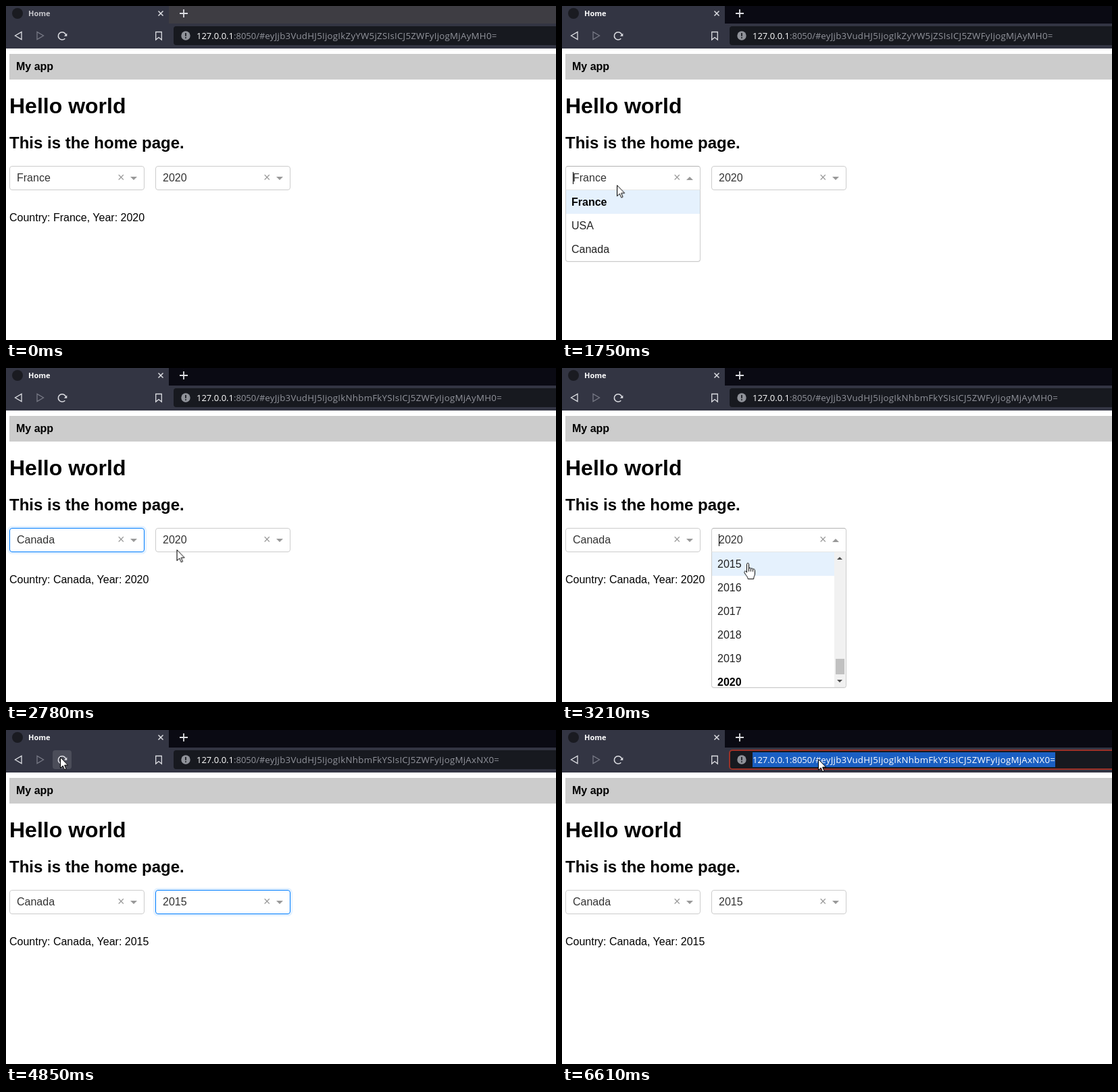
Animation of 814x495 px, one loop 8 s. Source, as an HTML page:

```html
<!DOCTYPE html>
<html lang="en">
<head>
<meta charset="utf-8">
<title>Home</title>
<style>
html, body { margin: 0; width: 100%; height: 100%; overflow: hidden; background: #fff; }
body { position: relative; font: 16px "Liberation Sans", Arial, sans-serif; color: #000; }
body *, .select::after { position: absolute; box-sizing: border-box; white-space: pre; margin: 0; }
svg * { position: static; }

/* Every step-wise change shares one 8 s clock. */
.t { animation: 8s step-end infinite; }
.hid { opacity: 0; }

/* Browser frame */
.strip { left: 0; top: 0; width: 100%; height: 26px; background: #3e3d43; animation-name: strip; }
.bar { left: 0; top: 26px; width: 100%; height: 37px; background: #333543; }
.tab { left: 0; top: 0; width: 241px; height: 27px; background: #333543; color: #c8c8cd; animation-name: tab; }
.tab b { left: 33px; top: 3px; font: 700 11px/16px "Open Sans", sans-serif; }
.icons { left: 0; top: 0; width: 280px; height: 63px; overflow: visible; fill: none; stroke: #dcdde2; stroke-width: 1.3; }
.reload { left: 69px; top: 30px; width: 28px; height: 28px; border-radius: 4px; background: #4b4d59; animation-name: reload; }
.field { left: 248px; top: 30px; width: 580px; height: 28px; border-radius: 4px; background: #17191f; }
.ring { left: 247px; top: 29px; width: 580px; height: 30px; border-radius: 5px; border: 2px solid #9c3127; animation-name: picked; }
.url { left: 282px; top: 33px; height: 22px; font: 13px/22px "Open Sans", sans-serif; color: #fff; }
.url * { position: static; }
.url span { color: #92949c; }
.url i { font-style: normal; font-size: 13.3px; letter-spacing: .25px; }

/* Page */
.head { left: 5px; top: 71px; width: 100%; height: 38px; padding-left: 10px; background: #ccc; font-weight: 700; line-height: 38px; }
h1 { left: 5px; top: 130px; font-size: 32px; line-height: 36px; }
h2 { left: 5px; top: 189px; font-size: 24px; line-height: 28px; }
.out { left: 5px; top: 304px; line-height: 20px; }
.select { top: 237px; width: 200px; height: 36px; border: 1px solid #ccc; border-radius: 4px; line-height: 34px; color: #333; }
.select > span { left: 10px; top: 0; }
.select > em { left: 159px; top: -1px; font-size: 18px; font-style: normal; color: #999; }
.select > i { left: 178px; top: 15px; border: 5px solid transparent; border-top-color: #999; border-bottom: 0; }
.caret { left: 10px; top: 8px; width: 1px; height: 18px; background: #000; }
.menu { left: -1px; top: 34px; width: 200px; overflow: hidden; background: #fff; border: 1px solid #ccc;
  border-top-color: #e6e6e6; border-radius: 0 0 4px 4px; box-shadow: 0 1px 0 #0000000f; line-height: 35px; color: #222; }
.menu p { left: 8px; top: calc(35px * var(--n)); height: 35px; }
.menu .on { color: #000; font-weight: 700; }
.lit { left: 0; top: 0; width: 100%; height: 35px; background: #e5f1fd; }
.scroll { right: 0; top: 0; width: 17px; height: 200px; background: #f1f1f1; }
.scroll * { left: 2px; top: 158px; width: 13px; height: 23px; background: #c1c1c1; }
.scroll .up, .scroll .down { left: 4px; top: 7px; width: 0; height: 0; background: none;
  border: 4px solid transparent; border-bottom-color: #505050; border-top: 0; }
.scroll .down { top: 189px; rotate: 180deg; }
.blank { left: 0; top: 63px; width: 100%; bottom: 0; background: #fff; animation-name: blank; }

/* Pointer */
.pointer { left: 0; top: 0; width: 0; height: 0; animation: move 8s infinite, appear 8s step-end infinite; }
.pointer svg { left: 0; top: 0; overflow: visible; width: 20px; height: 28px; fill: #fff; stroke: #000; stroke-linejoin: round; }
.halo { left: -12px; top: -12px; width: 24px; height: 24px; border-radius: 50%; background: #ffff0080; animation-name: click; }

@keyframes strip { 16%, 100% { background: #0a0a13; } }
@keyframes tab { 16%, 100% { color: #fff; } }
@keyframes home { 29.5%, 45%, 63.9% { opacity: 0; } 31.1%, 46.7%, 66.5% { opacity: 1; } }
@keyframes busy { 29.5%, 45%, 63.9% { opacity: 1; } 31.1%, 46.7%, 66.5% { opacity: 0; } }
@keyframes reload { 55.1% { opacity: .6; } 59.6% { opacity: 1; } 63.9% { opacity: .5; } 74.7%, 100% { opacity: 0; } }

@keyframes state-a { 30.3%, 100% { opacity: 0; } }
@keyframes state-b { 30.3% { opacity: 1; } 45.8%, 100% { opacity: 0; } }
@keyframes state-c { 45.8%, 100% { opacity: 1; } }
@keyframes picked { 81.6%, 100% { opacity: 1; } }
@keyframes mark { 81.6%, 100% { background: #1a5fc2; } }
@keyframes white { 81.6%, 100% { color: #fff; } }

@keyframes country-old { 29.5%, 100% { opacity: 0; } }
@keyframes country-new { 29.5%, 100% { opacity: 1; } }
@keyframes year-old { 45%, 100% { opacity: 0; } }
@keyframes year-new { 45%, 100% { opacity: 1; } }

@keyframes open1 { 16% { opacity: 1; } 29.5% { opacity: 0; } }
@keyframes open2 { 37.25% { opacity: 1; } 45% { opacity: 0; } }
@keyframes flip1 { 16% { rotate: 180deg; } 29.5%, 100% { rotate: 0deg; } }
@keyframes flip2 { 37.25% { rotate: 180deg; } 45%, 100% { rotate: 0deg; } }
@keyframes caret1 { 16% { opacity: 1; } 22.6% { opacity: 0; } }
@keyframes caret2 { 37.25% { opacity: 1; } 44% { opacity: 0; } }
@keyframes lit1 { 24.3% { translate: 0 35px; } 26% { translate: 0 70px; } }
@keyframes lit2 { 0% { translate: 0 175px; } 38.3%, 100% { translate: 0 0; } }
@keyframes box1 {
  11.2% { box-shadow: 0 1px 0 #0000000f; }
  16% { border-color: #b3b3b3 #ccc #d9d9d9; border-radius: 4px 4px 0 0; }
  29.5% { border-color: #007eff; border-radius: 4px; box-shadow: 0 0 0 3px #007eff1a; }
  37.25%, 100% { border-color: #ccc; border-radius: 4px; box-shadow: none; }
}
@keyframes box2 {
  35.2% { box-shadow: 0 1px 0 #0000000f; }
  37.25% { border-color: #b3b3b3 #ccc #d9d9d9; border-radius: 4px 4px 0 0; }
  45% { border-color: #007eff; border-radius: 4px; box-shadow: 0 0 0 3px #007eff1a; }
  62.1%, 100% { border-color: #ccc; border-radius: 4px; box-shadow: none; }
}
@keyframes blank { 62.1% { opacity: 1; } 63.9% { opacity: 0; } }

@keyframes appear { 0% { opacity: 0; } 4.1%, 100% { opacity: 1; } }
@keyframes click {
  15.1%, 28.6%, 36.4%, 44.1%, 59.6%, 80.8% { opacity: 1; }
  16.8%, 29.5%, 37.25%, 45%, 60.5%, 81.6% { opacity: 0; }
}
@keyframes arrow { 22.6%, 38.3% { opacity: 0; } 29.5%, 45% { opacity: 1; } }
@keyframes hand { 22.6%, 38.3% { opacity: 1; } 29.5%, 45% { opacity: 0; } }
@keyframes move {
  0%, 4.1% { translate: 418px 457px; animation-timing-function: ease-out; }
  12%, 21% { translate: 81px 262px; animation-timing-function: ease-in-out; }
  27.8%, 31.2% { translate: 83px 357px; animation-timing-function: ease-in-out; }
  35.6%, 37.3% { translate: 266px 262px; animation-timing-function: linear; }
  40.125% { translate: 275px 289px; animation-timing-function: linear; }
  41% { translate: 278px 302px; }
  41.75%, 46% { translate: 278px 301px; animation-timing-function: ease-in-out; }
  53.6% { translate: 120px 50px; animation-timing-function: ease-out; }
  57.1%, 73.9% { translate: 80px 40px; animation-timing-function: ease-in; }
  76.5% { translate: 200px 58px; animation-timing-function: ease-out; }
  80.8%, 100% { translate: 379px 43px; }
}
</style>
</head>
<body>
<div class="head">My app</div>
<h1>Hello world</h1>
<h2>This is the home page.</h2>
<div class="out t" style="animation-name:state-a">Country: France, Year: 2020</div>
<div class="out t hid" style="animation-name:state-b">Country: Canada, Year: 2020</div>
<div class="out t hid" style="animation-name:state-c">Country: Canada, Year: 2015</div>

<div class="select t" style="left:5px;animation-name:box1">
  <span class="t" style="animation-name:country-old">France</span>
  <span class="t hid" style="animation-name:country-new">Canada</span>
  <div class="caret t hid" style="animation-name:caret1"></div>
  <em>×</em><i class="t" style="animation-name:flip1"></i>
  <div class="menu t hid" style="height:107px;animation-name:open1">
    <div class="lit t" style="animation-name:lit1"></div>
    <p class="on" style="--n:0">France</p><p style="--n:1">USA</p><p style="--n:2">Canada</p>
  </div>
</div>

<div class="select t" style="left:221px;animation-name:box2">
  <span class="t" style="animation-name:year-old">2020</span>
  <span class="t hid" style="animation-name:year-new">2015</span>
  <div class="caret t hid" style="animation-name:caret2"></div>
  <em>×</em><i class="t" style="animation-name:flip2"></i>
  <div class="menu t hid" style="height:202px;animation-name:open2">
    <div class="lit t" style="animation-name:lit2"></div>
    <p style="--n:0">2015</p><p style="--n:1">2016</p><p style="--n:2">2017</p>
    <p style="--n:3">2018</p><p style="--n:4">2019</p><p class="on" style="--n:5">2020</p>
    <div class="scroll"><div></div><div class="up"></div><div class="down"></div></div>
  </div>
</div>
<div class="blank t hid"></div>

<div class="strip t"></div>
<div class="bar"></div>
<div class="tab t">
  <b class="t" style="animation-name:home">Home</b>
  <b class="t hid" style="animation-name:busy">Updating...</b>
</div>
<div class="reload t hid"></div>
<div class="field"></div>
<div class="ring t hid"></div>
<svg class="icons">
  <circle cx="17" cy="11" r="8" fill="#1a1b21" stroke="none"/>
  <path d="M225.5 7.5l7 7m0-7l-7 7" stroke-width="1.5"/>
  <path d="M257 11h12M263 5v12" stroke-width="1.8"/>
  <path d="M23 38.5v11L13.5 44z"/>
  <path d="M46 38.5v11l9.5-5.5z" stroke="#777985"/>
  <path d="M87.3 48.2A5.7 5.7 0 1 1 88.6 43" stroke-width="1.5"/>
  <path d="M90.3 40.5v4.3h-4.4z" fill="#dcdde2" stroke="none"/>
  <path d="M221.7 38.5h8.6v11.6L226 46.6l-4.3 3.5z"/>
  <circle cx="266" cy="44" r="6.7" fill="#8f9299" stroke="none"/>
  <path d="M266 40v4.8m0 1.5v1.7" stroke="#17191f" stroke-width="1.7"/>
</svg>
<div class="url t" style="animation-name:state-a">127.0.0.1<span>:8050/#<i>eyJjb3VudHJ5IjogIkZyYW5jZSIsICJ5ZWFyIjogMjAyMH0=</i></span></div>
<div class="url t hid" style="animation-name:state-b">127.0.0.1<span>:8050/#<i>eyJjb3VudHJ5IjogIkNhbmFkYSIsICJ5ZWFyIjogMjAyMH0=</i></span></div>
<div class="url t hid" style="animation-name:state-c,mark">127.0.0.1<span class="t" style="animation-name:white">:8050/#<i>eyJjb3VudHJ5IjogIkNhbmFkYSIsICJ5ZWFyIjogMjAxNX0=</i></span></div>

<div class="pointer">
  <div class="halo t hid"></div>
  <svg class="t" style="animation-name:arrow"><path d="M.5 .5V16.5L4.2 13L6.7 18.7L9 17.7L6.6 12.1H11.6Z"/></svg>
  <svg class="t hid" style="animation-name:hand">
    <path d="M-1.5 1.5C-1.5-.4 1.5-.4 1.5 1.5V8C1.7 6.6 4.3 6.7 4.4 8.4C4.8 7.4 7.2 7.5 7.4 9.2C8 8.4 10.2 8.7 10.4 10.6V16C10.4 18.5 8.6 20 8.6 23.5H.2C.2 21-2 19-4.8 14.8C-5.8 13.2-4.8 11.6-3.4 12C-2.4 12.3-2 13-1.5 13.8Z"/>
    <path d="M1.5 8v4.5M4.4 8.5v4M7.4 9.4v3.3" fill="none"/>
  </svg>
</div>
</body>
</html>
```
